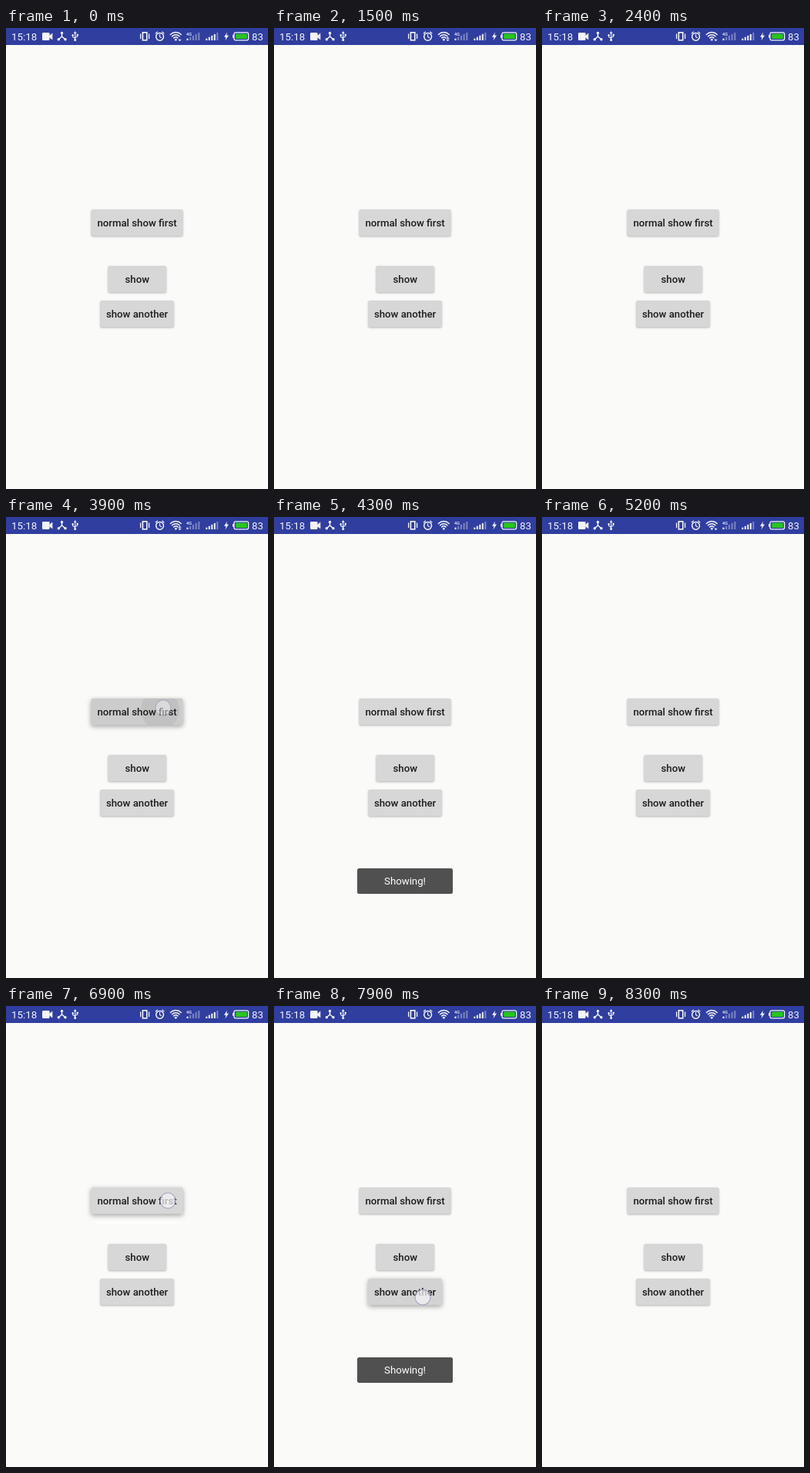
Animation, 340 px wide and 597 px high, one loop 9100 ms. Source, as an HTML page with a canvas:

```html
<!DOCTYPE html>
<html lang="en">
<head>
<meta charset="utf-8">
<title>Toast demo</title>
<style>
html, body { margin: 0; width: 100%; height: 100%; overflow: hidden; background: #fafafa; }
canvas { display: block; width: 340px; height: 597px; }
</style>
</head>
<body>
<canvas id="stage"></canvas>
<script>
const W = 340, H = 597, LOOP = 9100, STEP = 100;
const canvas = document.getElementById('stage');
const dpr = window.devicePixelRatio || 1;
canvas.width = W * dpr;
canvas.height = H * dpr;
const c = canvas.getContext('2d');
const FONT = 'Roboto, "Noto Sans CJK SC", "Noto Sans CJK", sans-serif';

const buttons = [
  { label: 'normal show first', x: 110.5, y: 235, w: 119 },
  { label: 'show', x: 132.5, y: 308, w: 75.5 },
  { label: 'show another', x: 122.3, y: 353, w: 95.5 }
];

// hold: extra steps the finger stays down before the ripple
const taps = [
  { at: 500, btn: 1, x: 177, y: 324, r: 33, hold: 0 },
  { at: 1800, btn: 2, x: 186, y: 372, r: 30, hold: 2 },
  { at: 3700, btn: 0, x: 204, y: 247, r: 25, hold: 0 },
  { at: 4700, btn: 1, x: 184, y: 319, r: 34, hold: 0 },
  { at: 6900, btn: 0, x: 210, y: 252, r: 27, hold: 0 },
  { at: 7800, btn: 2, x: 193, y: 377, r: 32, hold: 0 }
];

const toasts = [{ show: 4000, swap: 4900 }, { show: 7200, swap: 8000 }];

// time and arrows of the wifi activity mark
const wifiMarks = [[0, 'd'], [700, ''], [1500, 'ud'], [2100, 'd'], [3300, 'ud'], [4300, ''], [5000, 'd'], [6100, '']];

function box(x, y, w, h, r, fill) {
  c.beginPath();
  c.roundRect(x, y, w, h, r);
  c.fillStyle = fill;
  c.fill();
}

function poly(pts, fill) {
  c.beginPath();
  for (let i = 0; i < pts.length; i += 2) c.lineTo(pts[i], pts[i + 1]);
  c.closePath();
  c.fillStyle = fill;
  c.fill();
}

function line(...pts) {
  c.beginPath();
  for (let i = 0; i < pts.length; i += 2) c.lineTo(pts[i], pts[i + 1]);
  c.stroke();
}

function disc(x, y, r, fill) {
  c.beginPath();
  c.arc(x, y, r, 0, Math.PI * 2);
  c.fillStyle = fill;
  c.fill();
}

function arc(x, y, r, from, to) {
  c.beginPath();
  c.arc(x, y, r, from * Math.PI, to * Math.PI);
  c.stroke();
}

function text(str, x, y, size, color, weight = 400, align = 'center') {
  c.font = `${weight} ${size}px ${FONT}`;
  c.textAlign = align;
  c.fillStyle = color;
  c.fillText(str, x, y);
}

function shadow(color, blur, dy) {
  c.shadowColor = color;
  c.shadowBlur = blur * dpr;
  c.shadowOffsetY = dy * dpr;
}

function statusBar(t) {
  const white = '#f4f5fc', dim = 'rgba(255,255,255,.38)';
  box(0, 0, W, 22, 0, '#2f3e9f');
  text('15:18', 7, 15.5, 13.3, white, 400, 'left');
  c.strokeStyle = white;
  c.lineCap = 'round';

  // camera
  box(47, 6, 9.5, 10, 1.2, white);
  poly([56, 10, 60.3, 6.5, 60.3, 15.5, 56, 12], white);

  // three-way node
  c.lineWidth = 1.5;
  line(72.5, 7, 72.5, 11, 68.3, 14.8);
  line(72.5, 11, 77, 14.8);
  disc(72.5, 6.5, 1.7, white);
  disc(68.3, 14.8, 1.7, white);
  disc(77, 14.8, 1.7, white);

  // usb
  c.lineWidth = 1.1;
  line(89.7, 6, 89.7, 15);
  line(86.7, 9.5, 86.7, 11.5, 89.7, 13.5);
  line(92.7, 8.5, 92.7, 11, 89.7, 12.5);
  poly([87.8, 7, 89.7, 4, 91.6, 7], white);
  disc(89.7, 15.6, 1.5, white);
  disc(86.7, 9.2, 1.2, white);
  box(91.6, 7.8, 2.2, 2.2, 0, white);

  // vibrate
  c.lineWidth = 1.6;
  c.strokeRect(177.4, 5.8, 5.4, 10);
  c.lineWidth = 1.3;
  line(174.6, 8, 174.6, 13.6);
  line(185.6, 8, 185.6, 13.6);

  // alarm
  c.lineWidth = 1.5;
  arc(199.6, 11.3, 4.9, 0, 2);
  c.lineWidth = 1.1;
  line(199.6, 8.6, 199.6, 11.5, 201.7, 12.7);
  line(194.2, 7, 196.6, 5);
  line(202.6, 5, 205, 7);

  // wifi
  c.lineWidth = 1.5;
  for (const r of [3.6, 6.7, 9.8]) arc(220.3, 15.4, r, 1.25, 1.75);
  disc(220.3, 15.2, 1.4, white);
  const mark = wifiMarks.filter(m => m[0] <= t).pop()[1];
  if (mark.includes('u')) poly([223.4, 13.7, 225.5, 11.4, 227.6, 13.7], white);
  if (mark.includes('d')) poly([223.4, 14.8, 227.6, 14.8, 225.5, 17.2], white);

  // signals
  text('4G', 234, 9.6, 5.6, white, 500, 'left');
  for (let i = 0; i < 5; i++) {
    const h = 2.4 + i * 1.9;
    box(234.5 + i * 3.7, 16 - h, 2, h, 0, i < 1 ? white : dim);
    box(259.3 + i * 3.5, 16 - h, 2, h, 0, i < 4 ? white : dim);
  }

  // charging
  poly([287, 5.5, 283, 11.7, 285.5, 11.7, 284.5, 16.2, 289, 9.6, 286.2, 9.6], white);
  c.lineWidth = 1.3;
  c.beginPath();
  c.roundRect(296, 5.8, 18.6, 10, 2);
  c.stroke();
  box(294, 8.8, 1.8, 4, .5, white);
  box(298.2, 7.6, 14.6, 6.4, .5, '#27c51d');
  text('83', 319, 15.5, 13.2, white, 400, 'left');
}

function tapPhase(tap, t) {
  const n = Math.floor((t - tap.at) / STEP);
  return n < 2 ? n : Math.max(1, n - tap.hold);
}

function drawButton(b, tap, phase) {
  const h = 34.3;
  const raised = tap && phase < 3;
  c.save();
  if (raised) shadow('rgba(0,0,0,.36)', 6, 2);
  else shadow('rgba(0,0,0,.28)', 2.5, 1);
  box(b.x, b.y, b.w, h, 2, '#d7d7d7');
  c.restore();
  if (tap && phase > 0) {
    c.save();
    c.beginPath();
    c.roundRect(b.x, b.y, b.w, h, 2);
    c.clip();
    c.fillStyle = `rgba(0,0,0,${[0, .02, .05, .03][phase]})`;
    c.fill();
    if (phase === 2) disc(tap.x - 4, tap.y + 3, tap.r, 'rgba(0,0,0,.055)');
    if (phase === 3) disc(b.x + b.w / 2, b.y + h / 2, tap.r * 2, 'rgba(0,0,0,.04)');
    c.restore();
  }
  text(b.label, b.x + b.w / 2, b.y + 21.8, 13.22, '#1c1c1c', 500);
}

function touchDot(tap, phase) {
  c.save();
  c.globalAlpha = phase === 2 ? .7 : 1;
  disc(tap.x, tap.y, 10, 'rgba(244,244,246,.72)');
  c.strokeStyle = 'rgba(125,125,175,.6)';
  c.lineWidth = 1.1;
  arc(tap.x, tap.y, 10, 0, 2);
  c.restore();
}

function drawToast(t) {
  const item = toasts.find(o => t >= o.show && t < o.swap + 300);
  if (!item) return;
  const swapped = t >= item.swap;
  const alpha = swapped ? [.9, .7, .3][(t - item.swap) / STEP] : t === item.show ? .45 : 1;
  const w = swapped ? 100.5 : 124;
  c.save();
  c.globalAlpha = alpha;
  box(170 - w / 2, 455, w, 33, 2.5, '#505050');
  c.globalAlpha = Math.min(1, alpha + .1);
  text(swapped ? '苹果!' : 'Showing!', 170, 476.2, 13.22, '#fff');
  c.restore();
}

function draw(t) {
  c.setTransform(dpr, 0, 0, dpr, 0, 0);
  box(0, 0, W, H, 0, '#fafaf9');
  statusBar(t);
  const tap = taps.find(p => t >= p.at && tapPhase(p, t) < 4);
  const phase = tap ? tapPhase(tap, t) : 0;
  buttons.forEach((b, i) => drawButton(b, tap && tap.btn === i ? tap : null, phase));
  drawToast(t);
  if (tap && phase < 3) touchDot(tap, phase);
}

const start = performance.now();
function tick() {
  const t = (performance.now() - start) % LOOP;
  draw(Math.floor(t / STEP) * STEP);
  requestAnimationFrame(tick);
}
tick();
</script>
</body>
</html>
```
